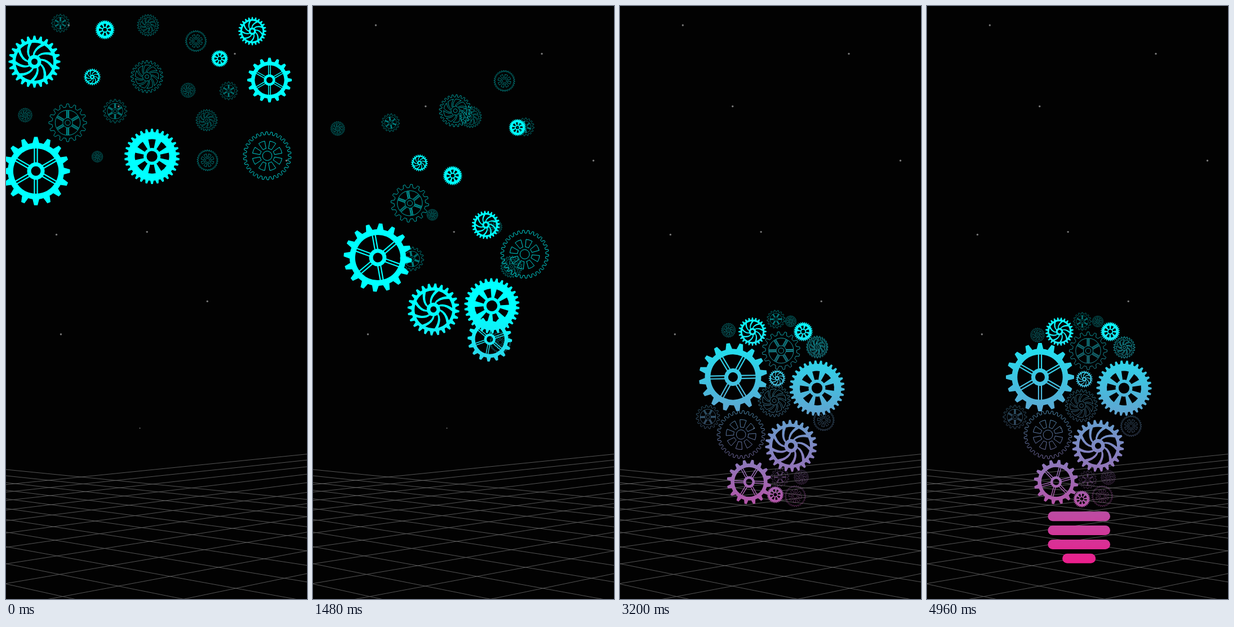
Write an HTML page that moves like this. It is 534 px wide and 1049 px high and loops after 5000 ms.

```html
<!DOCTYPE html>
<html lang="en">
<head>
<meta charset="utf-8">
<title>Gear bulb</title>
<style>
  html, body { margin: 0; width: 100%; height: 100%; overflow: hidden; background: #020202; }
  svg { display: block; width: 100%; height: 100%; }
</style>
</head>
<body>
<svg viewBox="0 0 534 1049" preserveAspectRatio="none">
  <defs>
    <linearGradient id="tint" gradientUnits="userSpaceOnUse" x1="0" y1="542" x2="0" y2="986">
      <stop offset="0" stop-color="#00ffff"/>
      <stop offset="1" stop-color="#ec1e8c"/>
    </linearGradient>
    <mask id="shape" maskUnits="userSpaceOnUse" x="0" y="0" width="534" height="1049">
      <g id="thin" fill="none" stroke="#fff" stroke-linejoin="round"></g>
      <g id="solid" fill="#fff" fill-rule="evenodd"></g>
      <g id="bars" fill="#fff"></g>
    </mask>
  </defs>
  <rect width="534" height="1049" fill="#020202"/>
  <path id="floor" fill="none" stroke="#6a6a6a" stroke-width=".8"/>
  <g id="stars" fill="#777"></g>
  <rect width="534" height="1049" fill="url(#tint)" mask="url(#shape)"/>
</svg>
<script>
const LOOP = 5000, DEPART = 604, BEAT = 70, TRAVEL = 2340, RAD = Math.PI / 180;
const byId = id => document.getElementById(id);

function add(parent, tag, attrs) {
  const el = document.createElementNS('http://www.w3.org/2000/svg', tag);
  for (const k in attrs) el.setAttribute(k, attrs[k]);
  return byId(parent).appendChild(el);
}

function bezier(x1, y1, x2, y2) {
  const at = (s, a, b) => 3 * (1 - s) * (1 - s) * s * a + 3 * (1 - s) * s * s * b + s * s * s;
  return x => {
    if (x <= 0) return 0;
    if (x >= 1) return 1;
    let lo = 0, hi = 1;
    for (let i = 0; i < 24; i++) {
      const mid = (lo + hi) / 2;
      if (at(mid, x1, x2) < x) lo = mid; else hi = mid;
    }
    return at(lo, y1, y2);
  };
}
const ease = bezier(.25, .1, .25, 1);
const spin = bezier(.34, 0, .44, 1);

// Gear outlines: angles in degrees, clockwise from the top
const pt = (r, a) => (r * Math.sin(a * RAD)).toFixed(2) + ' ' + (-r * Math.cos(a * RAD)).toFixed(2);
const arc = (r, a, sweep) => `A${r} ${r} 0 0 ${sweep} ${pt(r, a)}`;
const ring = r => `M0 ${-r}A${r} ${r} 0 1 1 0 ${r}A${r} ${r} 0 1 1 0 ${-r}Z`;
const repeat = (n, f) => Array.from({ length: n }, (_, i) => f(i * 360 / n)).join('');

function teeth(n, tip, root, base, top) {
  const p = 360 / n;
  return repeat(n, a => (a ? arc(root, a - base * p, 1) : 'M' + pt(root, -base * p)) +
    'L' + pt(tip, a - top * p) + arc(tip, a + top * p, 1) + 'L' + pt(root, a + base * p)) + 'Z';
}

// Opening between radii r1 and r2; a1..b1 is its inner edge, a2..b2 its outer edge
function cell(r1, r2, a1, b1, a2, b2, bend = 0) {
  const side = (r, from, to) => bend
    ? `Q${pt((r1 + r2) / 2, (from + to) / 2 + bend)} ${pt(r, to)}`
    : 'L' + pt(r, to);
  return 'M' + pt(r1, a1) + side(r2, a1, a2) + arc(r2, b2, 1) + side(r1, b2, b1) + arc(r1, a1, 0) + 'Z';
}

function spokeCells(a) {
  const lean = (h, r) => Math.asin(h / r) / RAD;
  const i = lean(3.7, 15.5), o = lean(3.7, 40), m = lean(1.5, 15.5), q = lean(1.5, 40);
  return cell(15.5, 40, a + i, a + 60 - i, a + o, a + 60 - o) +
    cell(15.5, 40, a - m, a + m, a - q, a + q);
}

const models = {
  spoke: {
    size: 60.5, way: 1,
    d: teeth(16, 60.5, 50, .3, .13) + ring(8.5) + repeat(6, spokeCells)
  },
  swirl: {
    size: 46, way: 1,
    d: teeth(24, 46, 39, .34, .13) + ring(5.5) +
      repeat(9, a => cell(12, 33.5, a, a + 26, a + 32, a + 61, -9))
  },
  slot: {
    size: 49, way: -1,
    d: teeth(30, 49, 43, .33, .15) + ring(9.6) +
      repeat(8, a => cell(15, 30.5, a - 13, a + 13, a - 12.5, a + 12.5))
  }
};

// One group leaves per beat: style, radius, from x y, to x y
const groups = [
  [
    ['solid spoke', 39.5, 467.5, 131, 229, 842],
    ['solid swirl', 46, 50.5, 98.5, 303.5, 778],
    ['solid slot', 49, 259, 266, 349.5, 676],
    ['solid swirl', 25, 437, 44.5, 235, 576],
    ['thin swirl', 19, 356, 202, 350, 604]
  ],
  [],
  [['thin slot', 18.5, 357.5, 273, 311, 867]],
  [['solid slot', 17, 175.5, 42, 325, 576], ['thin spoke', 21, 193.5, 186, 156, 727]],
  [['solid spoke', 60.5, 53, 292, 200.5, 656.5]],
  [
    ['thin slot', 42.5, 463.5, 265, 214.5, 758.5],
    ['thin spoke', 33.5, 109.5, 206.5, 286, 610],
    ['thin swirl', 13, 323, 149, 321.5, 834],
    ['thin swirl', 10, 162, 266.5, 303, 558]
  ],
  [['solid swirl', 15, 153, 125.5, 279, 660], ['thin swirl', 19, 252, 34, 350, 604]],
  [['thin spoke', 16, 96.5, 30.5, 285, 838]],
  [['solid slot', 15, 379, 93, 274.5, 872], ['thin spoke', 16, 395, 150, 275.5, 558]],
  [['thin slot', 18.5, 337, 62, 362, 743], ['thin swirl', 28.5, 250, 125, 274, 707]],
  [['thin swirl', 12.5, 34, 193, 196, 582]]
];

function makeGear([style, r, x0, y0, x1, y1], start) {
  const [layer, name] = style.split(' ');
  const { size, way, d } = models[name], scale = r / size, thin = layer === 'thin';
  const el = add(layer, 'path', { d, 'stroke-width': (.15 + .014 * r) / scale });
  // Smaller solid gears turn further
  const turn = way * (thin ? 180 : 180 + 3.6 * (60.5 - r));
  const angle = thin && name === 'slot' ? 22.5 : 0;
  return t => {
    const p = ease((t - start) / TRAVEL);
    const a = angle + turn * spin(t / LOOP);
    el.setAttribute('transform',
      `translate(${x0 + (x1 - x0) * p} ${y0 + (y1 - y0) * p}) rotate(${a}) scale(${scale})`);
  };
}

function makeBar(i) {
  const w = i < 3 ? 110.6 : 59, h = 17;
  const el = add('bars', 'rect', { x: -w / 2, y: -h / 2, width: w, height: h, rx: h / 2 });
  return t => {
    const s = ease((t - 3200 - 200 * i) / 360);
    el.setAttribute('transform', `translate(269.7 ${902.8 + 24.8 * i}) scale(${s})`);
  };
}

// Fan of floor lines: even steps in depth, steeper as they come nearer
function fan(near, far, depth, step, slope, rate) {
  let d = '';
  for (let k = 0; k < 12; k++) {
    const rise = 1 / (depth - step * k), drop = slope + rate * (rise - 1 / depth);
    d += `M${near} ${604 + rise}L${far} ${604 + rise + 534 * drop}`;
  }
  return d;
}
byId('floor').setAttribute('d',
  fan(534, 0, .0053, .00028, .101, .0005) + fan(0, 534, .00463, .000224, .099, .0006));

[[111.4, 34], [406, 84.5], [199.8, 177.5], [497.5, 273.5], [89.5, 404.4],
 [250.2, 399.6], [357.2, 522.4], [97.4, 580.8], [237.5, 746.8, 1]]
  .forEach(([cx, cy, r = 1.7]) => add('stars', 'circle', { cx, cy, r }));

const parts = [
  ...groups.flatMap((group, k) => group.map(g => makeGear(g, DEPART + BEAT * k))),
  ...[0, 1, 2, 3].map(makeBar)
];

function frame(now) {
  const t = now % LOOP;
  parts.forEach(update => update(t));
  requestAnimationFrame(frame);
}
frame(0);
</script>
</body>
</html>
```
